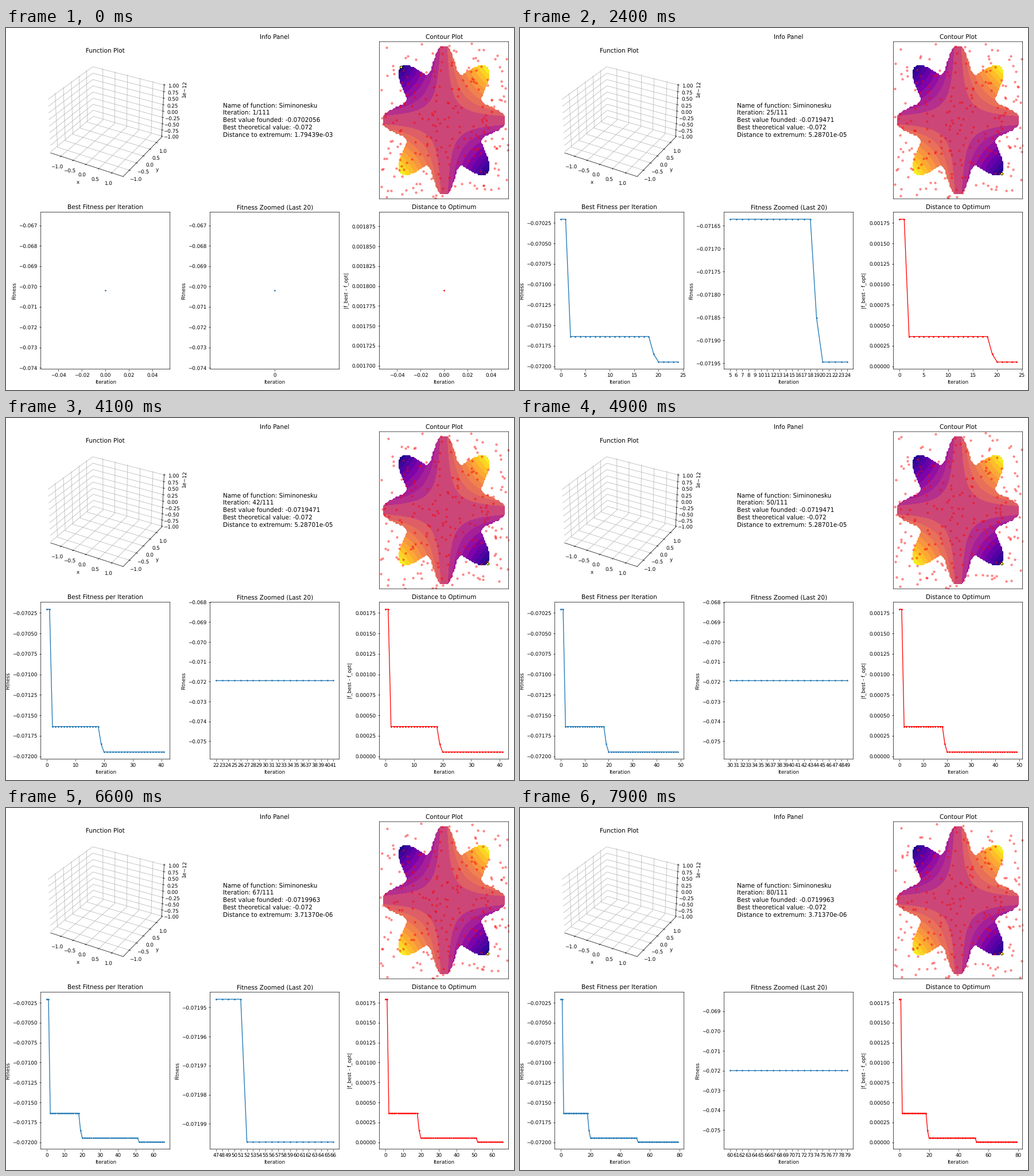
Write a matplotlib script that moves like this. It is 885 by 632 pixels and loops after 8000 ms.

```python
import numpy as np
import matplotlib.pyplot as plt
from matplotlib.animation import FuncAnimation

DPI = 63.2
FRAMES, TOTAL, WINDOW = 80, 111, 20
LIM, OPT = 1.25, -0.072

# Soft thin lines and unhinted glyphs, as in a scaled-down figure
plt.rcParams.update({"path.snap": False, "text.hinting": "none"})

# (first iteration, distance to optimum, best x, best y)
STAGES = [
    (0, 1.79439e-3, -0.8320, 0.8440),
    (2, 3.64163e-4, -0.8540, 0.8388),
    (19, 1.49e-4, 0.8430, -0.8523),
    (20, 5.28701e-5, 0.8485, -0.8480),
    (52, 3.71370e-6, 0.8487, -0.8484),
]


def stage(i):
    return [s for s in STAGES if s[0] <= i][-1]


dist = np.array([stage(i)[1] for i in range(FRAMES)])
best = OPT + dist
iters = np.arange(FRAMES)

# Population: mostly steady points with a few newcomers in each iteration
COUNT = 230
base = np.random.default_rng(8).uniform(-LIM, LIM, (COUNT, 2))


def population(i):
    rng = np.random.default_rng(1000 + i)
    pts = base + rng.normal(0, 0.012, base.shape)
    fresh = rng.random(COUNT) < 0.06
    pts[fresh] = rng.uniform(-LIM, LIM, (fresh.sum(), 2))
    return np.clip(pts, -LIM, LIM)


fig = plt.figure(figsize=(885.0001 / DPI, 632 / DPI), dpi=DPI)
fig.subplots_adjust(left=60.7 / 885, right=875.6 / 885,
                    bottom=1 - 595.6 / 632, top=1 - 23.9 / 632,
                    wspace=0.3107, hspace=0.0846)

# Empty 3D view
ax3 = fig.add_subplot(2, 3, 1, projection="3d")
ax3.set(title="Function Plot", xlabel="x", ylabel="y",
        xlim=(-1.425, 1.425), ylim=(-1.425, 1.425))
ax3.set_xticks(np.arange(-2, 3) * 0.5)
ax3.set_yticks(np.arange(-2, 3) * 0.5)
ax3.set_zticks(np.arange(-4, 5) * 0.25e-12)
ax3.set_zlim(-1.04e-12, 1.04e-12)
for axis in (ax3.xaxis, ax3.yaxis, ax3.zaxis):
    axis.set_pane_color("white")

# Text panel
panel = fig.add_subplot(2, 3, 2)
panel.set_title("Info Panel")
panel.axis("off")
info = panel.text(0.1, 0.5, "", fontsize=12, va="center", linespacing=1.26)

# Contour of 0.1xy inside the star-shaped region
cont = fig.add_subplot(2, 3, 3)
g = np.linspace(-LIM, LIM, 100)
X, Y = np.meshgrid(g, g)
inside = np.hypot(X, Y) <= 1 + 0.2 * np.cos(8 * np.arctan2(X, Y))
Z = np.where(inside, 0.1 * X * Y, np.nan)
levels = [0.008 * k for k in range(-9, 10) if k]
cont.contourf(X, Y, np.ma.masked_invalid(Z), levels=levels, cmap="plasma")
swarm = cont.scatter(*base.T, c="red", s=15, alpha=0.4)
mark = cont.scatter([0], [0], c="yellow", s=25, edgecolors="black", zorder=3)
cont.set(title="Contour Plot", xticks=[], yticks=[],
         xlim=(-LIM, LIM), ylim=(-LIM, LIM))


def history(pos, title, ylabel, color):
    ax = fig.add_subplot(2, 3, pos)
    ax.set(title=title, xlabel="Iteration", ylabel=ylabel)
    line, = ax.plot([], [], color=color, marker="o", markersize=2)
    return line


full = history(4, "Best Fitness per Iteration", "Fitness", "tab:blue")
zoom = history(5, "Fitness Zoomed (Last 20)", "Fitness", "tab:blue")
gap = history(6, "Distance to Optimum", "|f_best - f_opt|", "red")


def refit(line, x, y):
    line.set_data(x, y)
    line.axes.relim()
    line.axes.autoscale(True)
    line.axes.autoscale_view()


def update(i):
    seen = slice(0, i + 1)
    last = slice(max(0, i + 1 - WINDOW), i + 1)
    refit(full, iters[seen], best[seen])
    zoom.axes.set_xticks(iters[last])
    refit(zoom, iters[last], best[last])
    refit(gap, iters[seen], dist[seen])

    swarm.set_offsets(population(i))
    mark.set_offsets([stage(i)[2:]])
    info.set_text("Name of function: Siminonesku\n"
                  f"Iteration: {i + 1}/{TOTAL}\n"
                  f"Best value founded: {best[i]:.6g}\n"
                  f"Best theoretical value: {OPT}\n"
                  f"Distance to extremum: {dist[i]:.5e}")
    return full, zoom, gap, swarm, mark, info


anim = FuncAnimation(fig, update, frames=FRAMES, interval=100,
                     repeat=True, repeat_delay=0, blit=False)
plt.show()
```
